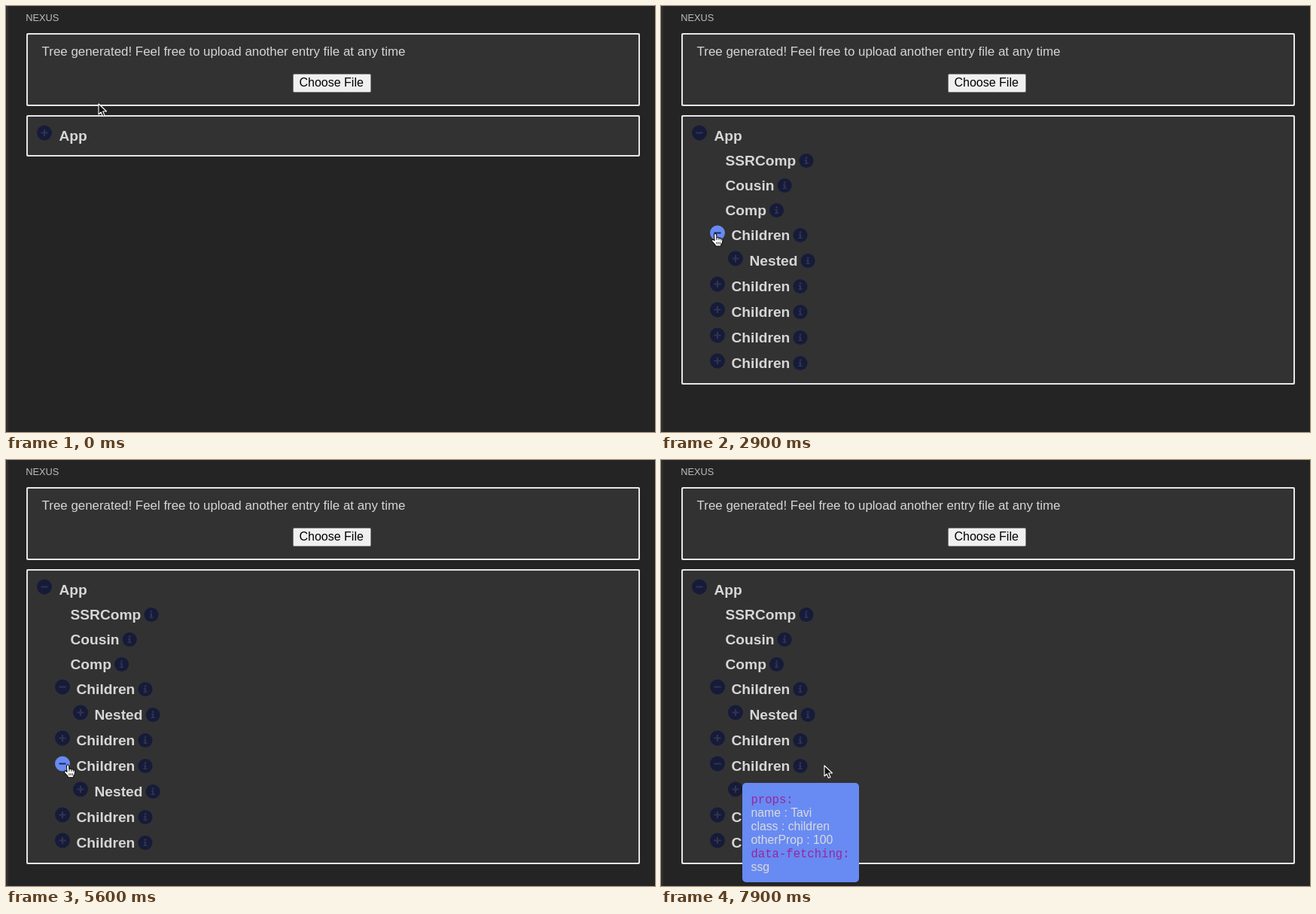
Animation, 862 px wide and 566 px high, one loop 8 s. Source, as an HTML page with a canvas:

```html
<!DOCTYPE html>
<html lang="en">
<head>
<meta charset="utf-8">
<title>Component tree</title>
<style>
  html, body { margin: 0; width: 100%; height: 100%; overflow: hidden; background: #242424; }
  canvas { display: block; width: 862px; height: 566px; }
</style>
</head>
<body>
<canvas id="stage" width="862" height="566"></canvas>
<script>
const ctx = document.getElementById('stage').getContext('2d');
const LOOP = 8000, STEP = 100;
const SANS = '"Liberation Sans", Arial, sans-serif';
const MONO = '"Liberation Mono", "Courier New", monospace';
const TEXT = '#d6d6d6', NAVY = '#171b3a', BLUE = '#688af3';

// Pointer path: time, x, y of the hot spot
const PATH = [
  [0, 123, 130], [200, 96, 146], [400, 62, 168], [600, 50, 179], [1600, 50, 179],
  [1700, 53, 191], [2000, 62, 238], [2400, 72, 302], [3300, 72, 302],
  [3700, 33, 338], [4200, 49, 393], [4500, 67, 404.5], [5500, 67, 404.5],
  [6200, 171.5, 406], [6400, 177.5, 405.5], [6800, 177.5, 405.5],
  [6900, 179.5, 406], [7600, 179.5, 406], [7900, 217, 406], [LOOP, 217, 406]
];

function pointerAt(t) {
  const i = PATH.findIndex(p => p[0] > t);
  const [t0, x0, y0] = PATH[i - 1], [t1, x1, y1] = PATH[i];
  const k = (t - t0) / (t1 - t0);
  return { x: x0 + (x1 - x0) * k, y: y0 + (y1 - y0) * k };
}

// Visible tree rows with their positions and icons
function treeRows(t) {
  const rows = [{ label: 'App', x: 71, y: 172, toggle: { x: 51, y: 168.5, open: t >= 1000 } }];
  if (t < 1000) return rows;
  ['SSRComp', 'Cousin', 'Comp'].forEach((label, i) =>
    rows.push({ label, x: 86, y: 205 + 33 * i, info: true }));
  let y = 304;
  const branch = (label, x, open) => {
    rows.push({ label, x, y, toggle: { x: x - 19, y: y - 2.5, open }, info: true });
    y += 34;
  };
  for (let i = 0; i < 5; i++) {
    const open = (i === 0 && t >= 2900) || (i === 2 && t >= 4800);
    branch('Children', 94, open);
    if (open) branch('Nested', 118, false);
  }
  return rows;
}

function write(str, x, y, font, color = TEXT) {
  ctx.font = font;
  ctx.fillStyle = color;
  ctx.fillText(str, x, y);
}

function box(x, y, w, h, r, color) {
  ctx.fillStyle = color;
  ctx.beginPath();
  ctx.roundRect(x, y, w, h, r);
  ctx.fill();
}

function card(y, bottom) {
  box(27, y, 815, bottom - y, 2, '#e6e6e6');
  box(29, y + 2, 811, bottom - y - 4, 1, '#323232');
}

function disc(x, y, r, color) {
  ctx.fillStyle = color;
  ctx.beginPath();
  ctx.arc(x, y, r, 0, Math.PI * 2);
  ctx.fill();
}

function drawToggle({ x, y, open }, hover) {
  disc(x, y, 10, hover ? BLUE : NAVY);
  ctx.fillStyle = hover ? '#202b54' : '#31354b';
  ctx.fillRect(x - 4.5, y - 1, 9, 2);
  if (!open) ctx.fillRect(x - 1, y - 4.5, 2, 9);
}

function drawInfo(x, y, hover) {
  disc(x, y, 9.5, hover ? BLUE : NAVY);
  ctx.fillStyle = hover ? '#202b54' : '#31354b';
  ctx.fillRect(x - 1.2, y - 5, 2.4, 2.4);
  ctx.fillRect(x - 2.2, y - 1.5, 3.2, 1.5);
  ctx.fillRect(x - 1, y - 1.5, 2, 5);
  ctx.fillRect(x - 2.5, y + 3, 5, 1.5);
}

function drawTooltip() {
  box(108, 429, 155, 132, 5, BLUE);
  const heading = (s, y) => write(s, 119.5, y, '15.6px ' + MONO, '#98269a');
  const line = (s, y) => write(s, 119.5, y, '15.8px ' + SANS, '#dadada');
  heading('props:', 455.5);
  line('name : Tavi', 474);
  line('class : children', 492);
  line('otherProp : 100', 510);
  heading('data-fetching:', 527.5);
  line('ssg', 546);
}

const ARROW = new Path2D('M0 0V14L3.2 11L5.5 16.5L8 15.5L5.7 10H10.5Z');
const HAND = new Path2D('M-1.6 1.5Q0-.8 1.6 1.5L2 6Q3.8 4.8 5 6.4Q6.8 5.6 7.8 7.2' +
  'Q9.6 6.8 9.9 9L9.3 12.5L7.8 15V17H.2V15.5L-4 10.8Q-5 9-3.6 8.4Q-2.2 8.2-.9 9.6Z');
const FINGERS = new Path2D('M2 6V9M5 6.6V9.2M7.7 7.4V9.6M2 11.5V14.5M4.2 11.5V14.5M6.4 11.5V14.5');

function drawPointer({ x, y }, isHand) {
  ctx.save();
  ctx.translate(x, y);
  ctx.lineJoin = 'round';
  ctx.lineWidth = 1.1;
  ctx.fillStyle = isHand ? '#fff' : '#111';
  ctx.strokeStyle = isHand ? '#111' : '#fff';
  const shape = isHand ? HAND : ARROW;
  ctx.fill(shape);
  ctx.stroke(shape);
  if (isHand) {
    ctx.lineWidth = 0.9;
    ctx.stroke(FINGERS);
  }
  ctx.restore();
}

function draw(t) {
  const pointer = pointerAt(t);
  let isHand = false;
  const hovered = (x, y) => {
    const d = Math.hypot(pointer.x - x, pointer.y - y);
    if (d < 15) isHand = true;
    return d < 11;
  };

  ctx.fillStyle = '#242424';
  ctx.fillRect(0, 0, 862, 566);
  ctx.fillStyle = '#2f2f2f';
  ctx.fillRect(0, 0, 3, 566);
  write('NEXUS', 26.3, 20, '12.8px ' + SANS, '#bcbcbc');

  card(36, 133);
  write('Tree generated! Feel free to upload another entry file at any time',
    47.6, 66, '16.9px ' + SANS);
  box(381, 90, 104, 25, 2, '#858585');
  box(382, 91, 102, 23, 1, '#f0f0f0');
  write('Choose File', 389.5, 107, '16px ' + SANS, '#000');

  const rows = treeRows(t);
  card(145, rows.length > 1 ? rows[rows.length - 1].y + 29 : 200);
  for (const { label, x, y, toggle, info } of rows) {
    write(label, x - 0.5, y + 7, 'bold 19.2px ' + SANS);
    if (toggle) drawToggle(toggle, hovered(toggle.x, toggle.y));
    if (info) {
      const ix = x + ctx.measureText(label).width + 13.2;
      drawInfo(ix, y + 0.5, hovered(ix, y + 0.5));
    }
  }

  if (t >= 6400) drawTooltip();
  drawPointer(pointer, isHand);
}

const start = performance.now();
function tick() {
  const t = (performance.now() - start) % LOOP;
  draw(Math.floor(t / STEP) * STEP);
  requestAnimationFrame(tick);
}
tick();
</script>
</body>
</html>
```
